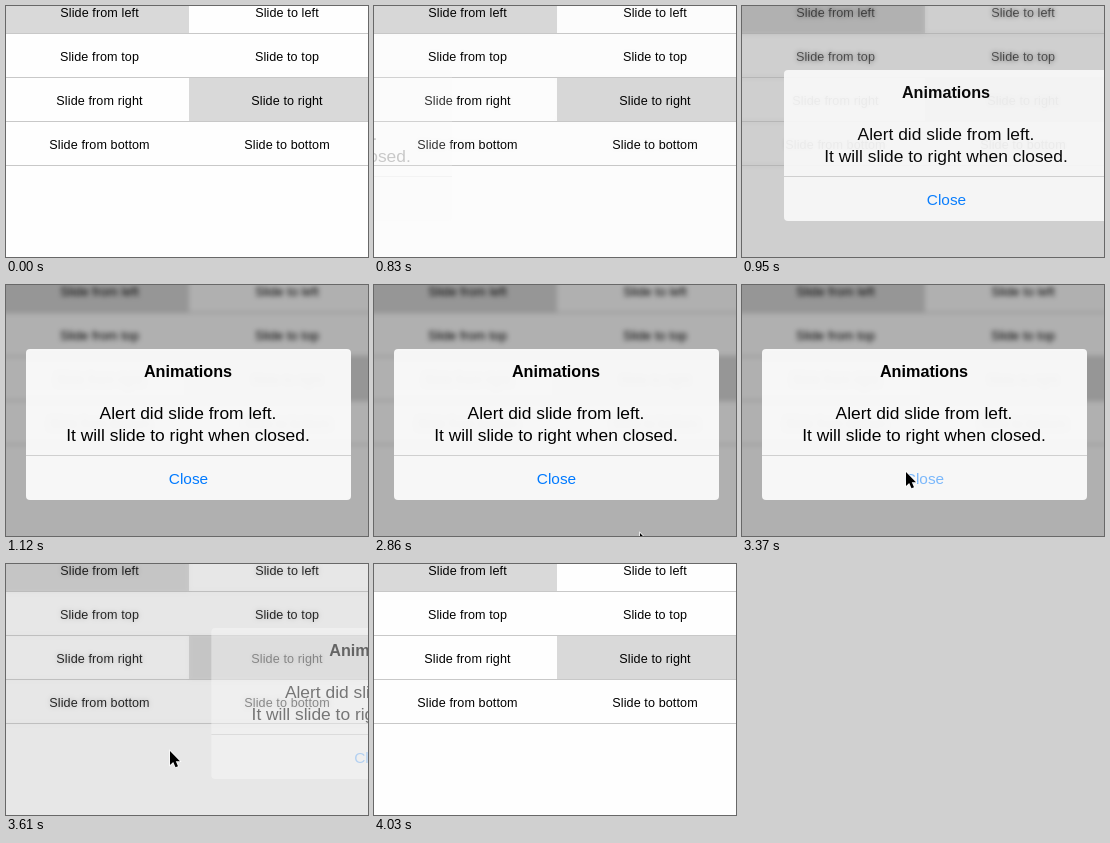
Recreate the animation shown at these times as an HTML page. Size 362x251 px, loop 4880 ms.

```html
<!DOCTYPE html>
<html lang="en">
<head>
<meta charset="utf-8">
<title>Alert animation</title>
<style>
  html, body { margin: 0; width: 100%; height: 100%; overflow: hidden; background: #fefefe; }
  svg { display: block; }
  text { font-family: "Liberation Sans", Arial, sans-serif; text-anchor: middle; }
  #page text { font-size: 12.6px; letter-spacing: .1px; }
  #page path { stroke: #c8c8c8; }
  #alert text { font-size: 17.4px; }
  #alert .title { font-size: 16.2px; font-weight: bold; }
  #alert #close { font-size: 15.4px; fill: #007aff; }
</style>
</head>
<body>
<svg width="362" height="251" viewBox="0 0 362 251">
  <defs>
    <filter id="blur" filterUnits="userSpaceOnUse" x="-20" y="-20" width="402" height="291" color-interpolation-filters="sRGB">
      <feGaussianBlur stdDeviation="2.4"/>
    </filter>
  </defs>
  <g id="page">
    <rect x="-20" y="-20" width="402" height="291" fill="#fefefe"/>
    <rect x="-20" y="-20" width="203" height="47" fill="#d9d9d9"/>
    <rect x="183" y="72" width="199" height="43" fill="#d9d9d9"/>
    <path d="M-20 27.5H382M-20 71.5H382M-20 115.5H382M-20 159.5H382"/>
  </g>
  <g id="shade">
    <use href="#page" filter="url(#blur)"/>
    <rect width="362" height="251" opacity=".31"/>
  </g>
  <g id="alert">
    <rect x="20" y="64" width="325" height="151" rx="4" fill="#f9f9f9" opacity=".97"/>
    <path d="M20 170.5H345" stroke="#d0d0d0"/>
    <text class="title" x="182" y="92">Animations</text>
    <text x="182" y="134">Alert did slide from left.</text>
    <text x="182" y="156">It will slide to right when closed.</text>
    <text id="close" x="182.5" y="199">Close</text>
  </g>
  <path id="cursor" d="M0 0V14L3.2 11 5.5 16.2 8 15.2 5.8 10.2H10Z" stroke="#fff" stroke-width="1.4" paint-order="stroke"/>
</svg>
<script>
const LOOP = 4880;
const OPEN = 830, MOVE = 2860, CLOSE = 3370, LEAVE = 3970;
// The picture holds between these moments.
const STEPS = [0, 830, 890, 950, 1000, 1060, 1120,
  2860, 2920, 2980, 3030, 3090, 3140, 3200,
  3370, 3430, 3490, 3550, 3610, 3670, 3970, 4030];
const SLIDE_IN = [[830, -267], [890, -85], [950, 22], [1000, 17], [1060, 6], [1120, 0]];

const el = id => document.getElementById(id);
const clamp = v => Math.min(1, Math.max(0, v));
const page = el('page'), shade = el('shade'), alertBox = el('alert');
const closeLabel = el('close'), cursor = el('cursor');

['left', 'top', 'right', 'bottom'].forEach((side, row) => {
  [['from', 93.5], ['to', 281]].forEach(([word, x]) => {
    const label = document.createElementNS('http://www.w3.org/2000/svg', 'text');
    label.setAttribute('x', x);
    label.setAttribute('y', 11 + 44 * row);
    label.textContent = `Slide ${word} ${side}`;
    page.append(label);
  });
});

function along(points, t) {
  const i = points.findIndex(p => p[0] >= t);
  if (i < 0) return points[points.length - 1][1];
  if (i === 0) return points[0][1];
  const [t0, v0] = points[i - 1], [t1, v1] = points[i];
  return v0 + (v1 - v0) * (t - t0) / (t1 - t0);
}

function place(node, x, y, opacity) {
  node.setAttribute('transform', `translate(${x} ${y})`);
  node.setAttribute('opacity', opacity);
}

function draw(time) {
  const t = STEPS.filter(s => s <= time).pop();
  const out = clamp((t - CLOSE) / 300);
  const fade = t < OPEN ? 0 : clamp(.2 + (t - OPEN) / 160);
  const x = along(SLIDE_IN, t) + 362 * out ** 3;
  place(alertBox, x, 0, fade * (1 - out ** 3));
  shade.setAttribute('opacity', clamp((t - OPEN + 4) / 210) * (1 - out ** 1.5));
  closeLabel.setAttribute('opacity', t < CLOSE ? 1 : .5);

  const p = clamp((t - MOVE) / 340), ease = p * p * (3 - 2 * p);
  const away = t >= LEAVE ? 9 : 0;
  place(cursor, 266 - 102 * ease + away, 248 - 61 * ease + away,
    t >= MOVE && t < LEAVE + 60 ? 1 : 0);
}

const start = performance.now();
function tick() {
  draw((performance.now() - start) % LOOP);
  requestAnimationFrame(tick);
}
tick();
</script>
</body>
</html>
```
